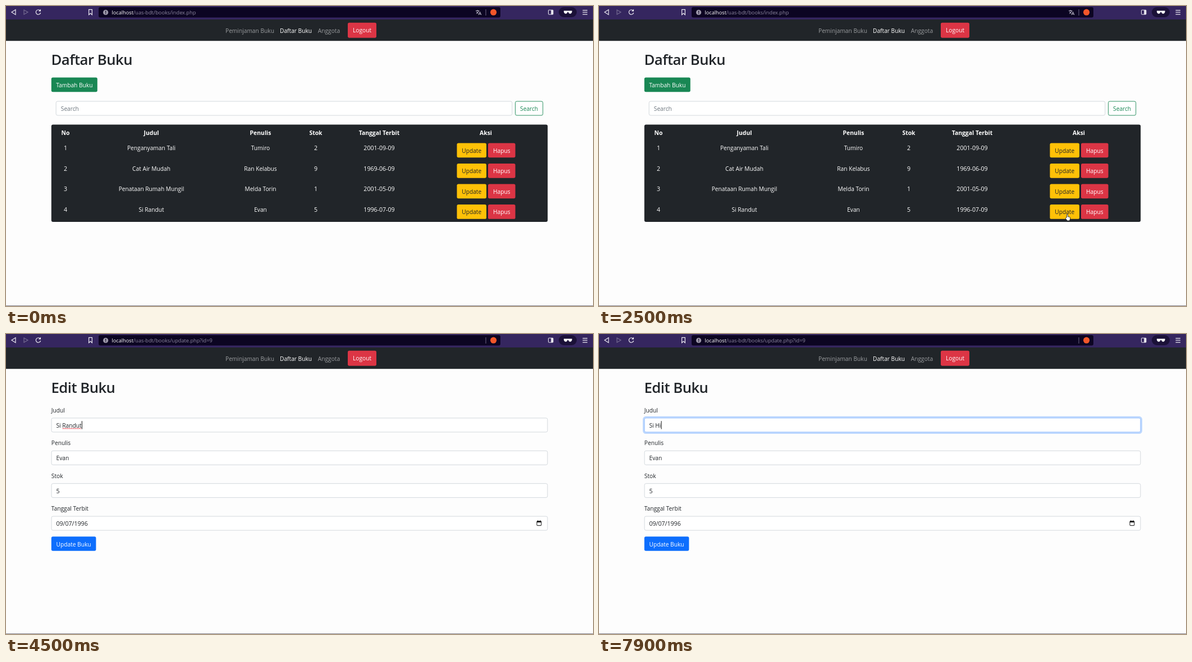
These frames come from a looping animation (1046x535 px, 8000 ms). An HTML page:

```html
<!DOCTYPE html>
<html lang="id">
<head>
<meta charset="utf-8">
<title>Daftar Buku</title>
<style>
  html, body { margin: 0; width: 100%; height: 100%; overflow: hidden; background: #fdfdfd; }
  svg { display: block; width: 100%; height: 100%; }
  text { font: 10.2px "Open Sans", "Noto Sans", sans-serif; fill: #212529; white-space: pre; }
  .light { fill: #fff; }
  .dim { fill: #9a9c9f; }
  .mid { text-anchor: middle; }
  .bold { font-weight: 700; font-size: 10.4px; }
  .num { font-size: 10.6px; }
  .title { font-size: 25.7px; font-weight: 600; letter-spacing: -.02em; }
  .url { font-size: 9.2px; fill: #8d88a0; }
  .status { font-size: 7.95px; fill: #fff; }
  .hint { fill: #6c757d; }
  .green { fill: #198754; }
  .line { fill: none; stroke: #eceaf2; stroke-width: 1.2; }
</style>
</head>
<body>
<svg id="stage" viewBox="0 0 1046 535"></svg>
<script>
const LOOP = 8000, STEP = 100;
const FIELD_X = 89.5;
const OLD_TITLE = "Si Randut";
const DARK = "#212529", RED = "#dc3545", YELLOW = "#ffc107";

const rect = (x, y, w, h, fill, r = 0, more = "") =>
  `<rect x="${x}" y="${y}" width="${w}" height="${h}" rx="${r}" fill="${fill}" ${more}/>`;
const text = (x, y, str, cls = "", more = "") =>
  `<text x="${x}" y="${y}" class="${cls}" ${more}>${str}</text>`;
const path = (d, more = 'class="line"') => `<path d="${d}" ${more}/>`;
const group = (id, body) => `<g id="${id}">${body}</g>`;
const button = (x, y, w, h, fill, label, cls = "light", more = "") =>
  rect(x, y, w, h, fill, 2.7, more) + text(x + w / 2, y + 17.4, label, "mid " + cls);
const box = (x, y, w, more = "") =>
  rect(x, y, w, 25, "#fff", 2.7, `stroke="#ced4da" stroke-width=".9" ${more}`);

function browserBar() {
  return rect(0, 0, 1046, 24, "#35265f") +
    path("M10 11L17 6.6V15.4Z") +
    path("M32 7L39 11L32 15Z", 'class="line" opacity=".35"') +
    path("M61 8.6A4.2 4.2 0 1 0 61.6 12") +
    path("M62 5.5V9.6H58Z", 'fill="#eceaf2"') +
    path("M147.6 6.3H153.4V15.6L150.5 13L147.6 15.6Z") +
    rect(165, 2, 716, 18.5, "#0c0522", 3) +
    `<circle cx="177.6" cy="11.4" r="4.6" fill="#9a95a8"/>` +
    rect(177, 8.6, 1.2, 3.6, "#0c0522") + rect(177, 13, 1.2, 1.2, "#0c0522") +
    text(188.4, 15, "", "url", 'id="url"') +
    group("translate",
      path("M837 8.6H843.4M840.2 7V8.6M838 13.6Q841.4 12 842.4 8.6M838.4 10.2Q840 12.6 841.8 13.2M842.2 16L844.5 10.4L846.8 16M843 14.2H846",
        'fill="none" stroke="#c9c5d6" stroke-width="1"')) +
    rect(854.5, 6, 1, 11, "#6d6784") +
    `<circle cx="868.6" cy="11.2" r="5.6" fill="#f2562a"/>` +
    rect(966.5, 7.2, 8.4, 7.8, "none", .8, 'stroke="#eceaf2"') +
    rect(971.3, 7.2, 3.6, 7.8, "#eceaf2") +
    rect(985, 2, 32, 18, "#1b1138", 9, 'id="pill"') +
    path("M994 8.6H1008.6V10.4Q1007.6 13.8 1004.8 13.8Q1002.6 13.6 1002 10.8H1000.6Q1000 13.6 997.8 13.8Q995 13.8 994 10.4Z", 'fill="#fff"') +
    path("M1027.5 7.6H1036M1027.5 11.2H1036M1027.5 14.8H1036");
}

function navBar() {
  return rect(0, 24, 1046, 38.2, DARK) +
    text(391, 47.6, "Peminjaman Buku", "dim") +
    text(488, 47.6, "Daftar Buku", "light") +
    text(555.8, 47.6, "Anggota", "dim") +
    button(609, 29.7, 51, 27, RED, "Logout");
}

function listPage() {
  const cols = [106, 259, 453.5, 552, 665];
  const books = [
    ["Penganyaman Tali", "Tumiro", 2, "2001-09-09"],
    ["Cat Air Mudah", "Ran Kelabus", 9, "1969-06-09"],
    ["Penataan Rumah Mungil", "Melda Torin", 1, "2001-05-09"],
    [OLD_TITLE, "Evan", 5, "1996-07-09"],
  ];
  const head = ["No", "Judul", "Penulis", "Stok", "Tanggal Terbit"];
  const rows = books.map((book, i) => {
    const y = 36.55 * i;
    return [i + 1, ...book].map((cell, c) =>
      text(cols[c], 257 + y, cell, "mid light" + (c % 3 && c < 3 ? "" : " num"))).join("") +
      button(803.5, 244.4 + y, 52.5, 25.8, YELLOW, "Update", "", i === 3 ? 'id="hover"' : "") +
      button(859, 244.4 + y, 48.6, 25.8, RED, "Hapus");
  });
  return text(80.5, 105.4, "Daftar Buku", "title") +
    button(80.8, 127.6, 82, 25.7, "#198754", "Tambah Buku") +
    box(89.2, 170, 812.6) + text(97.8, 187, "Search", "hint") +
    button(907.5, 170, 49.2, 25, "#fff", "Search", "green", 'stroke="#198754" stroke-width=".9"') +
    rect(80.8, 211.6, 884.4, 173.4, DARK, 3) +
    head.map((h, c) => text(cols[c], 229.6, h, "mid light bold")).join("") +
    text(855, 229.6, "Aksi", "mid light bold") + rows.join("");
}

function editPage() {
  const fields = [["Judul", ""], ["Penulis", "Evan"], ["Stok", "5"], ["Tanggal Terbit", "09/07/1996"]];
  const body = fields.map(([label, value], i) => {
    const y = 58.4 * i;
    return text(80.8, 140 + y, label) +
      box(81.1, 149.9 + y, 883.8, i ? "" : 'id="field"') +
      text(FIELD_X, 166.8 + y, value, i > 1 ? "num" : "", i ? "" : 'id="value"');
  });
  return text(80.5, 105.4, "Edit Buku", "title") +
    rect(79.4, 148.2, 887.2, 28.4, "none", 4, 'id="glow" stroke="#0d6efd" stroke-width="2.8" stroke-opacity=".27"') +
    body.join("") +
    path("", 'id="squiggle" fill="none" stroke="#e5303c" stroke-width=".9"') +
    rect(0, 155.2, 1, 14.4, "#111", 0, 'id="caret"') +
    rect(946, 334, 7.8, 7.6, "none", .8, 'stroke="#111"') + rect(946, 333.6, 7.8, 2.4, "#111") +
    rect(947.2, 332.4, 1.2, 1.6, "#111") + rect(951.4, 332.4, 1.2, 1.6, "#111") +
    button(80.8, 361.2, 79.6, 25.6, "#0d6efd", "Update Buku");
}

function pointers() {
  const ink = 'fill="#fff" stroke="#111" stroke-width=".8" stroke-linejoin="round"';
  return group("arrow", path("M0 0V8.9L2.1 7L3.5 10.2L5 9.5L3.6 6.4H6.3Z", ink)) +
    group("hand", path("M2.5 6V1.2a1 1 0 0 1 2 0V4.6l3.2.8q1.2.4 1.1 1.6l-.6 3.2-.9 1.8H3.4L.6 8.2q-.5-1 .5-1.4z", ink)) +
    group("beam", path("M-1.6 -5H1.6M0 -5V5M-1.6 5H1.6", 'fill="none" stroke="#222" stroke-width=".9"'));
}

const stage = document.getElementById("stage");
stage.innerHTML = rect(0, 0, 1046, 535, "#fdfdfd") + browserBar() + navBar() +
  group("list", listPage()) + group("edit", editPage()) +
  rect(0, 534, 1046, 1, "#85838c") +
  group("status", rect(-3, 519.6, 164, 18, "#0c0522", 2.5) +
    text(1.8, 530, "localhost/uas-bdt/books/update.php?id=9", "status")) +
  pointers();

const el = {};
stage.querySelectorAll("[id]").forEach(node => el[node.id] = node);
const show = (id, on) => el[id].setAttribute("visibility", on ? "inherit" : "hidden");

const pen = document.createElement("canvas").getContext("2d");
function textWidth(str) {
  pen.font = '10.2px "Open Sans", "Noto Sans", sans-serif';
  return pen.measureText(str).width;
}

// time, x, y of the pointer
const route = [
  [200, 24, 4], [500, 300, 150], [800, 533, 197], [900, 533, 197], [1500, 665, 216],
  [1600, 665, 216], [1900, 727, 257], [2500, 831, 371], [3200, 831, 371],
  [3600, 604, 282], [3700, 604, 282], [4200, 123, 157], [4500, 123, 157],
];
function pointerAt(t) {
  const i = Math.max(1, route.findIndex(stop => stop[0] >= t));
  const [a, b] = [route[i - 1], route[i]];
  const k = (t - a[0]) / (b[0] - a[0]);
  return [a[1] + (b[1] - a[1]) * k, a[2] + (b[2] - a[2]) * k];
}

const deletions = [5900, 6200, 6400, 6600, 6800, 7000];
function titleAt(t) {
  if (t >= 7900) return "Si Hi";
  if (t >= 7600) return "Si H";
  return OLD_TITLE.slice(0, OLD_TITLE.length - deletions.filter(d => t >= d).length);
}
const caretOn = t => t >= 4500 && !(t >= 5000 && t < 5500) &&
  !(t >= 5900 && t < 6400) && !(t >= 7500 && t < 7600);

function drawSquiggle() {
  const from = FIELD_X + textWidth("Si "), to = FIELD_X + textWidth(OLD_TITLE);
  let d = "";
  for (let x = from, i = 0; x <= to; x += 1.4, i++) d += `${i ? "L" : "M"}${x} ${i % 2 ? 169.3 : 167.9}`;
  el.squiggle.setAttribute("d", d);
}

function drawPointer(t) {
  const shown = t >= 200 && t < 4500;
  const [x, y] = shown ? pointerAt(t) : [0, 0];
  const inField = t >= 3300 && [0, 1, 2, 3].some(i => Math.abs(y - 162.4 - 58.4 * i) < 13);
  const kind = t >= 2500 && t < 3300 ? "hand" : inField ? "beam" : "arrow";
  for (const id of ["arrow", "hand", "beam"]) {
    show(id, shown && id === kind);
    el[id].setAttribute("transform", `translate(${x} ${y})`);
  }
}

function render(ms) {
  const t = Math.floor((ms % LOOP) / STEP) * STEP;
  const editing = t >= 3000, focus = t >= 4600;
  show("list", !editing);
  show("edit", editing);
  show("translate", !editing);
  show("status", t >= 2600 && t < 3400);
  el.url.innerHTML = `<tspan fill="#fff">localhost</tspan>/uas-bdt/books/${editing ? "update.php?id=9" : "index.php"}`;
  el.pill.setAttribute("fill", t >= 800 && t < 2500 ? "#0d0624" : "#1b1138");
  el.hover.setAttribute("fill", t >= 2600 ? "#ffca2c" : YELLOW);

  const title = titleAt(t);
  el.value.textContent = title;
  el.caret.setAttribute("x", FIELD_X + textWidth(title) + .2);
  show("caret", editing && caretOn(t));
  show("glow", editing && focus);
  el.field.setAttribute("stroke", focus ? "#86b7fe" : "#ced4da");
  drawSquiggle();
  show("squiggle", editing && t >= 4500 && t < 5900);
  drawPointer(t);
}

const start = performance.now();
function tick() {
  render(performance.now() - start);
  requestAnimationFrame(tick);
}
tick();
</script>
</body>
</html>
```
